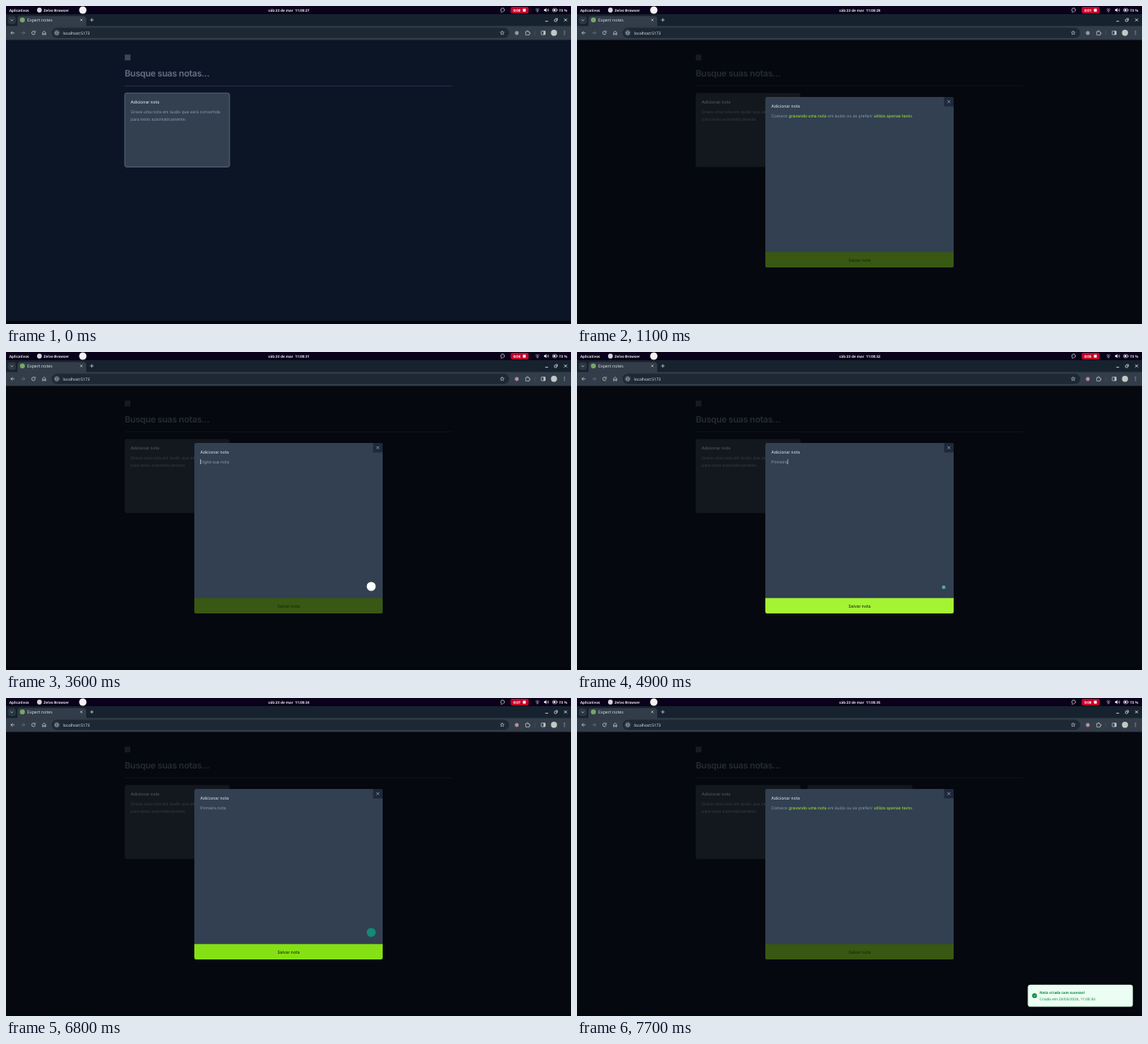
Write an HTML page with a canvas that moves like this. It is 690 px wide and 388 px high and loops after 8 s.

```html
<!DOCTYPE html>
<html lang="pt-BR">
<head>
<meta charset="utf-8">
<title>Expert notes</title>
<style>
html, body { margin: 0; width: 100%; height: 100%; overflow: hidden; background: #0c1526; }
canvas { display: block; width: 690px; height: 388px; }
</style>
</head>
<body>
<canvas id="stage"></canvas>
<script>
const W = 690, H = 388, LOOP = 8000, STEP = 100;
const UI = '"Noto Sans", sans-serif';
const PAGE = 'Inter, sans-serif';
const BODY = 5.03;

const T = {
  open: 1100, hoverLink: 2000, editor: 2900, bubble: 3200, caretOff: 3700,
  enabled: 4000, newLine: 5700, check: 6000, caretEnd: 6200, hoverSave: 6400, saved: 6900
};
const RECORD = [700, 1700, 2700, 3600, 4700, 5600, 6600, 7700];
const NOTE = 'Primeira nota';
const KEYS = [[4000, 1], [4200, 2], [4400, 3], [4500, 4], [4700, 5], [4800, 7], [4900, 8],
  [5000, 9], [5100, 10], [5200, 11], [5300, 12], [5400, 13]];

const canvas = document.getElementById('stage');
const ctx = canvas.getContext('2d');
const scale = window.devicePixelRatio || 1;
canvas.width = W * scale;
canvas.height = H * scale;
ctx.scale(scale, scale);
ctx.textRendering = 'geometricPrecision';

function rect(x, y, w, h, color) {
  ctx.fillStyle = color;
  ctx.fillRect(x, y, w, h);
}

function box(x, y, w, h, r, fill, stroke, width = 0.7) {
  ctx.beginPath();
  ctx.roundRect(x, y, w, h, r);
  if (fill) { ctx.fillStyle = fill; ctx.fill(); }
  if (stroke) { ctx.strokeStyle = stroke; ctx.lineWidth = width; ctx.stroke(); }
}

function disc(x, y, r, fill) {
  ctx.beginPath();
  ctx.arc(x, y, r, 0, 7);
  ctx.fillStyle = fill;
  ctx.fill();
}

function arc(x, y, r, from, to, color, width = 0.8) {
  ctx.beginPath();
  ctx.arc(x, y, r, from, to);
  ctx.strokeStyle = color;
  ctx.lineWidth = width;
  ctx.stroke();
}

function line(points, color, width = 0.8) {
  ctx.beginPath();
  points.forEach(([x, y], i) => i ? ctx.lineTo(x, y) : ctx.moveTo(x, y));
  ctx.strokeStyle = color;
  ctx.lineWidth = width;
  ctx.stroke();
}

function cross(x, y, r, color, width = 0.8) {
  line([[x - r, y - r], [x + r, y + r]], color, width);
  line([[x - r, y + r], [x + r, y - r]], color, width);
}

// Draws text centred on y and returns its right edge
function text(str, x, y, size, color, { font = PAGE, weight = 400, align = 'left', track = 0 } = {}) {
  ctx.font = `${weight} ${size}px ${font}`;
  ctx.letterSpacing = track + 'px';
  ctx.textAlign = align;
  ctx.fillStyle = color;
  ctx.fillText(str, x, y + size * 0.36);
  const end = x + ctx.measureText(str).width;
  ctx.letterSpacing = '0px';
  return end;
}

function topBar(t) {
  const bold = { font: UI, weight: 600 };
  rect(0, 0, W, 10, '#0a021a');
  text('Aplicativos', 4, 5, 4.4, '#e6e6ea', bold);
  disc(40.8, 5, 2.9, '#d4d4da');
  text('Zelvo Browser', 46, 5, 4.4, '#e6e6ea', bold);
  disc(93.8, 5, 4.5, '#f4f4f6');
  const sec = 27 + Math.floor((t + 600) / 1000);
  text(`sáb 23 de mar  11:00:${sec}`, 320.3, 5, 4.4, '#e6e6ea', bold);

  arc(606.5, 4.8, 2.2, 2.4, 7.5, '#d5d5dc', 0.8);
  line([[604.2, 7.3], [606.5, 7.1]], '#d5d5dc');
  box(616.3, 1, 22, 8, 2, '#c4042c');
  text(`0:0${RECORD.filter(at => t >= at).length}`, 619.5, 5, 4.4, '#fff', bold);
  rect(631.3, 3.4, 3.4, 3.4, '#fff');

  const icon = '#dcdce2';
  arc(649, 7, 3.8, 3.95, 5.48, '#77747f', 0.8);
  arc(649, 7, 2.2, 3.95, 5.48, icon, 0.8);
  disc(649, 6.8, 0.7, icon);
  ctx.beginPath();
  ctx.moveTo(657, 4); ctx.lineTo(658.4, 4); ctx.lineTo(660, 2.6);
  ctx.lineTo(660, 7.4); ctx.lineTo(658.4, 6); ctx.lineTo(657, 6);
  ctx.fillStyle = icon;
  ctx.fill();
  arc(660, 5, 1.4, -0.9, 0.9, icon, 0.7);
  arc(660, 5, 2.7, -0.9, 0.9, icon, 0.6);
  box(667.7, 3.2, 4.8, 3.6, 0.8, null, icon, 0.7);
  rect(668.5, 4, 2.6, 2, icon);
  rect(672.8, 4.2, 0.7, 1.6, icon);
  text('73 %', 675.3, 5, 4.4, '#e6e6ea', bold);
}

function browser(t) {
  const icon = '#c3c9d0', bar = '#323d49';
  rect(0, 10, W, 15, '#17222f');
  box(2.3, 12.4, 9.6, 9.6, 3, '#2c3743');
  line([[5.6, 16.6], [7.1, 18], [8.6, 16.6]], icon);
  box(14, 12.2, 84, 14, [3.5, 3.5, 0, 0], bar);
  disc(20, 17, 3, '#78a868');
  text('Expert notes', 26, 17.2, 5.2, '#d9dee4', { font: UI });
  cross(92, 17, 1.4, icon, 0.7);
  line([[102.7, 17], [106.9, 17]], icon);
  line([[104.8, 14.9], [104.8, 19.1]], icon);
  line([[658.6, 18.6], [662, 18.6]], '#e3e6e9');
  box(669.8, 16.2, 2.7, 2.7, 0.3, null, '#e3e6e9');
  line([[671, 15.2], [673.5, 15.2], [673.5, 17.8]], '#e3e6e9', 0.6);
  cross(683.4, 17, 1.6, '#e3e6e9', 0.9);

  rect(0, 24.4, W, 17, bar);
  line([[10.3, 32.8], [6, 32.8]], icon);
  line([[8, 30.8], [6, 32.8], [8, 34.8]], icon);
  line([[18.8, 32.8], [23, 32.8]], '#69737e');
  line([[21, 30.8], [23, 32.8], [21, 34.8]], '#69737e');
  arc(33.6, 32.8, 2.1, 0.3, 5.5, icon);
  line([[35.8, 30.3], [35.8, 32.2], [33.9, 32.2]], icon, 0.7);
  line([[44.7, 35], [44.7, 32.2], [46.6, 30.6], [48.5, 32.2], [48.5, 35], [47.2, 35],
    [47.2, 33.4], [46, 33.4], [46, 35], [44.5, 35]], icon, 0.7);
  box(55.8, 26.6, 558.6, 12.4, 6.2, '#1d2834');
  disc(62, 32.8, 4.2, '#303b47');
  arc(62, 32.8, 2.1, 0, 7, icon, 0.7);
  line([[60.2, 32.8], [63.8, 32.8]], icon, 0.6);
  text('localhost:5173', 69.4, 33, 4.87, '#dfe3e8', { font: UI });

  const star = Array.from({ length: 11 }, (_, i) => {
    const a = -Math.PI / 2 + i * Math.PI / 5, r = i % 2 ? 1.1 : 2.5;
    return [606 + r * Math.cos(a), 32.8 + r * Math.sin(a)];
  });
  line(star, icon, 0.6);
  disc(623.8, 33, 2.4, t >= T.editor ? '#b58f98' : '#8f98a2');
  line([[634.7, 31.3], [636.2, 31.3], [636.2, 30.2], [637.5, 30.2], [637.5, 31.3], [639, 31.3],
    [639, 32.7], [640, 32.7], [640, 33.9], [639, 33.9], [639, 35.3], [634.7, 35.3], [634.7, 31]], icon, 0.7);
  line([[645.8, 30], [645.8, 36]], '#4a5561', 0.6);
  box(653.7, 30.6, 4.8, 4.4, 0.4, null, icon, 0.7);
  rect(656.4, 30.6, 2.1, 4.4, icon);
  disc(669.2, 32.8, 3.7, '#c2c9c4');
  for (let i = -1; i < 2; i++) disc(682, 32.8 + i * 1.9, 0.55, icon);
}

function page(t) {
  const open = t >= T.open;
  rect(0, 41, W, 343, '#0c1526');
  rect(145, 59.3, 7, 7, '#3c4756');
  text('Busque suas notas...', 145, 82.3, 10.78, '#647387', { weight: 600, track: -0.27 });
  rect(145, 97, 400, 0.6, '#334155');

  const ring = open ? null : t < 100 ? '#5c6a7c' : '#596779';
  box(145, 106.2, 128, 90.2, 2.2, '#334050', ring, 0.9);
  text('Adicionar nota', 152.3, 117.2, BODY, '#dbe2ea', { weight: 500 });
  text('Grave uma nota em áudio que será convertida', 152.3, 129.4, BODY, '#8d9bad');
  text('para texto automaticamente.', 152.3, 138, BODY, '#8d9bad');
  if (t >= T.saved) box(281.6, 106.2, 128, 90.2, 2.2, '#334050');

  if (open) rect(0, 41, W, 343, 'rgba(0,0,0,.62)');
  rect(0, 384, W, 4, '#03060d');
}

function intro(t) {
  const y = 134, grey = '#8d9bad', lime = '#98d832', strong = { weight: 500 };
  let x = text('Comece ', 237.2, y, BODY, grey);
  x = text('gravando uma nota', x, y, BODY, lime, strong);
  x = text(' em áudio ou se preferir ', x, y, BODY, grey);
  const end = text('utilize apenas texto.', x, y, BODY, lime, strong);
  if (t >= T.hoverLink && t < T.editor) rect(x, 136.8, end - x, 0.5, lime);
}

function editor(t) {
  const count = KEYS.reduce((n, [at, len]) => t >= at ? len : n, 0);
  const typed = NOTE.slice(0, count);
  const end = text(typed || 'Digite sua nota', 237.2, 134, BODY, '#8d9bad');
  const caret = t < T.caretOff || (t >= T.enabled && t < T.caretEnd);
  if (caret) {
    const below = t >= T.newLine;
    rect(below || !count ? 237 : end + 0.1, below ? 139.5 : 130.8, 0.6, 6.2, '#d5dde6');
  }

  if (t >= T.check) disc(446, 286, 5.5, '#148a78');
  else if (t >= T.enabled) disc(447.8, 287, 2.2, '#45aeb0');
  else if (t >= T.bubble) disc(446, 286, t < T.bubble + 200 ? 5.1 : 5.5, '#fff');
}

function dialog(t) {
  box(230, 111, 230, 208, 2.2, '#324051');
  box(448.4, 111, 11.6, 11.6, [0, 2.2, 0, 0], '#1d283a');
  cross(454.1, 116.7, 1.8, '#a3b0c0', 0.7);
  text('Adicionar nota', 237.2, 122, BODY, '#cbd5e1', { weight: 500 });
  (t >= T.editor && t < T.saved ? editor : intro)(t);

  const active = t >= T.enabled && t < T.saved;
  const fill = !active ? '#385813' : t < T.hoverSave ? '#a4f434' : '#85e015';
  box(230, 300.3, 230, 18.7, [0, 0, 2.2, 2.2], fill);
  text('Salvar nota', 345, 309.8, BODY, active ? '#1a2e05' : '#182a0a', { weight: 500, align: 'center' });
}

function toast(t) {
  const p = Math.min(1, (t - T.saved) / 400);
  const ease = 1 - (1 - p) ** 3;
  const green = '#078a38';
  ctx.save();
  ctx.globalAlpha = ease;
  ctx.translate(0, (1 - ease) * 27);
  ctx.shadowColor = 'rgba(0,0,0,.1)';
  ctx.shadowBlur = 4;
  box(550.7, 350, 128, 26.6, 2.9, '#ecfdf3', '#c5f8da', 0.4);
  ctx.shadowBlur = 0;
  disc(558.8, 363.2, 2.9, green);
  line([[557.5, 363.3], [558.5, 364.2], [560.2, 362.2]], '#ecfdf3', 0.7);
  text('Nota criada com sucesso!', 565, 359.4, 4.35, green, { font: UI, weight: 600 });
  text('Criado em 23/03/2024, 11:00:34', 565, 367.4, 4.56, green, { font: UI });
  ctx.restore();
}

function draw(now) {
  const t = Math.floor(now % LOOP / STEP) * STEP;
  page(t);
  browser(t);
  topBar(t);
  if (t >= T.open) dialog(t);
  if (t >= T.saved) toast(t);
}

let start;
function tick(now) {
  start ??= now;
  draw(now - start);
  requestAnimationFrame(tick);
}
draw(0);
requestAnimationFrame(tick);
</script>
</body>
</html>
```
